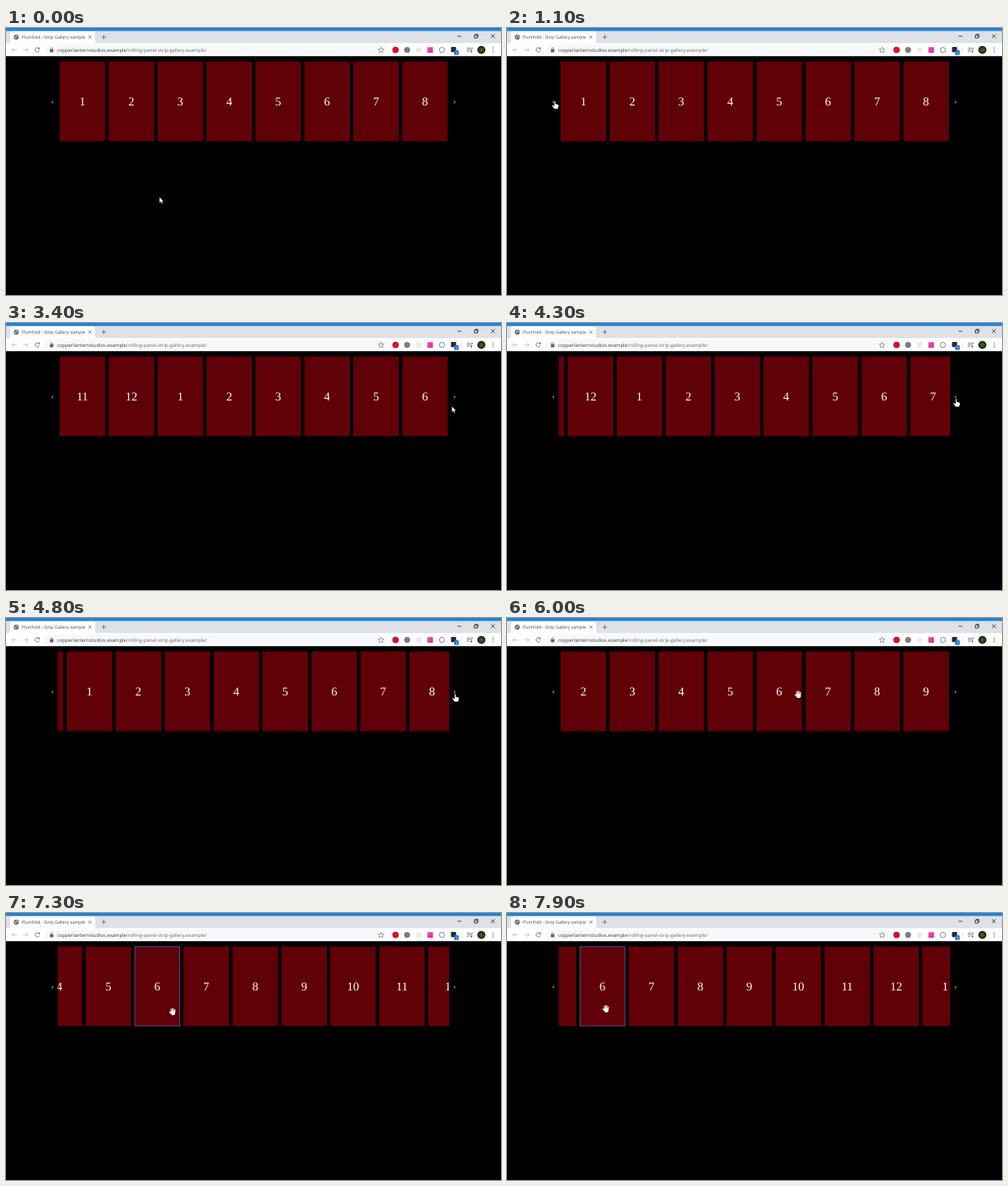
An HTML page that plays this animation: 600 by 324 pixels, repeating every 8 s.

```html
<!DOCTYPE html>
<html lang="en">
<head>
<meta charset="utf-8">
<title>Strip gallery</title>
<style>
  html, body { margin: 0; width: 100%; height: 100%; overflow: hidden; background: #000; }
  svg { display: block; width: 100%; height: 100%; }
  text { font-family: "Open Sans", "Noto Sans", sans-serif; text-rendering: geometricPrecision; }
  .number { font: 14.5px "Liberation Serif", "Times New Roman", serif; fill: #fff; text-anchor: middle; }
  .line { fill: none; stroke: #5f6368; stroke-width: .8; }
  .pointer { fill: #fff; stroke: #000; stroke-width: .4; stroke-linejoin: round; }
  .hand { fill: #fff; stroke: #fff; stroke-width: 1.1; stroke-linecap: round; stroke-linejoin: round; }
</style>
</head>
<body>
<svg viewBox="0 0 600 324">
  <defs>
    <clipPath id="window"><rect x="62.6" y="36" width="474.6" height="106"/></clipPath>
    <linearGradient id="pink" x2="1" y2="1">
      <stop stop-color="#f45bb0"/><stop offset="1" stop-color="#d8208a"/>
    </linearGradient>
    <radialGradient id="portrait">
      <stop stop-color="#4c6a2c"/><stop offset="1" stop-color="#12200c"/>
    </radialGradient>
  </defs>
  <rect width="600" height="324"/>

  <!-- Title bar and tab -->
  <rect width="600" height="19" fill="#dee1e6"/>
  <rect width="600" height="3.6" fill="#1c84d6"/>
  <path d="M2 18.5Q5 18.5 5 15.5V7Q5 4 8 4H105Q108 4 108 7V15.5Q108 18.5 111 18.5Z" fill="#fff"/>
  <circle cx="12.5" cy="11" r="3.1" fill="#5f6368"/>
  <path d="M10.4 10.2L12 11.4 11.8 13M12.8 8.6L13.2 10.2 14.8 11" class="line" style="stroke:#fff"/>
  <text x="19" y="13" font-size="5.35" fill="#45494d">Plumfold - Strip Gallery sample</text>
  <path d="M99.9 9.2l3.6 3.6m0-3.6l-3.6 3.6M115.8 11h5.4M118.5 8.3v5.4" class="line"/>
  <path d="M547.3 10h4.6M567.6 8.8h3.4v3.4h-3.4zM568.7 8.8v-1.1h3.4v3.4H571M587.9 7.6l4.6 4.6m0-4.6l-4.6 4.6" class="line" style="stroke:#222"/>

  <!-- Toolbar -->
  <rect y="18.4" width="600" height="15.8" fill="#fff"/>
  <path d="M12.8 26.6H7.2M9.8 23.8L7 26.6l2.8 2.8M21.2 26.6h5.6M24.2 23.8l2.8 2.8-2.8 2.8" class="line" style="stroke:#b4b7ba"/>
  <path d="M40.2 25A2.7 2.7 0 1 0 40.5 27.4M40.6 23.4V25.4H38.5" class="line"/>
  <rect x="47" y="20" width="416" height="13" rx="6.5" fill="#f7f8f9"/>
  <rect x="53.2" y="25.8" width="4.2" height="3.6" rx=".4" fill="#5f6368"/>
  <path d="M54.1 26v-1a1.2 1.2 0 0 1 2.4 0v1" class="line" style="stroke-width:.6"/>
  <text x="62" y="28.8" font-size="5.88" fill="#3c4043">copperlanternstudios.example<tspan fill="#6a6e73">/rolling-panel-strip-gallery.example/</tspan></text>
  <path d="M454.6 23.2l1 2.3 2.4.2-1.8 1.6.5 2.4-2.1-1.2-2.1 1.2.5-2.4-1.8-1.6 2.4-.2z" class="line" style="stroke-width:.6"/>
  <circle cx="472.2" cy="26.6" r="3.9" fill="#d4122e"/>
  <circle cx="486.2" cy="26.6" r="3.6" fill="#7c7c7e"/>
  <rect x="497" y="23.4" width="6.4" height="6.4" fill="#eeebec"/>
  <rect x="510.7" y="23.2" width="6.8" height="6.8" fill="url(#pink)"/>
  <circle cx="528.4" cy="26.6" r="3.1" class="line"/>
  <rect x="539.4" y="23" width="6.2" height="6.2" rx="1" fill="#26282a"/>
  <rect x="543.2" y="27" width="5.6" height="5.8" rx="1" fill="#2375d8"/>
  <text x="546" y="31.7" font-size="4.8" fill="#fff" text-anchor="middle">1</text>
  <path d="M551.8 22.5v8.5" class="line" style="stroke:#d5d8dc;stroke-width:.6"/>
  <path d="M558.6 24.4h4.4M558.6 26.4h4.4M558.6 28.4h2.6M564.2 28.6v-4.2h1.8" class="line"/>
  <circle cx="564" cy="28.8" r="1" fill="#5f6368"/>
  <circle cx="576.2" cy="26.6" r="4.9" fill="url(#portrait)"/>
  <path d="M590.5 24.2v4.9" class="line" style="stroke-width:1.4;stroke-linecap:round;stroke-dasharray:0 2.4"/>

  <!-- Carousel -->
  <g clip-path="url(#window)"><g id="track"></g></g>
  <path d="M57 88.4L55.6 90l1.4 1.6M543 88.4L544.4 90l-1.4 1.6" class="line" style="stroke:#f0f0f0"/>

  <g id="cursor">
    <path id="arrow" class="pointer" d="M0 0V7.4L1.8 5.8 3 8.6 4.2 8.1 3 5.4H5.3Z"/>
    <path id="finger" class="pointer" d="M-.8.6Q0-.4.8.6V3.6L3.6 4.2Q5 4.6 4.7 6L4 8.6Q3.8 9.8 2.8 9.8H0Q-.8 9.8-1.4 8.8L-3.4 6Q-3.6 4.6-2.2 5L-.8 6.2Z"/>
    <path id="grab" class="hand" d="M-1.5.3H2.7L2.5 2.4 1.7 3.9H-.7L-3.7.6-1.5 1ZM-2.2-2.6L-1.4.4M-.6-3.6L-.2.3M1.1-3.5V.3M2.9-2.3L2.6.4"/>
  </g>
</svg>
<script>
const LOOP = 8000, STEP = 100, PITCH = 59.33, FIRST_X = 65, SLIDE_WIDTH = 55.2, COUNT = 12;
const SLIDE_TIME = 500, DRAG_START = 6000, DRAG_SPEED = 1.9 / 1000;
const BUTTONS = { left: 57, right: 544, y: 90 };

// Button clicks: when, and by how many slides.
const clicks = [[1450, -1], [2100, -1], [4020, 1], [4520, 1], [5060, 1]];

// Straight cursor moves: from and until when, and where to.
const startPoint = [186, 205];
const moves = [
  [100, 400, 28, 114], [500, 1100, 58, 88.5], [2600, 3200, 539, 104], [3300, 3700, 544.5, 92],
  [5500, 6000, 353, 92.5], [6000, 7300, 202, 119.5], [7300, 7900, 120, 116]
];

const $ = id => document.getElementById(id);
const progress = (time, from, to) => Math.min(1, Math.max(0, (time - from) / (to - from)));
const bezier = (s, a, b) => 3 * s * (1 - s) ** 2 * a + 3 * s * s * (1 - s) * b + s ** 3;

// The CSS "ease" curve, solved by bisection.
function ease(x) {
  let low = 0, high = 1;
  for (let i = 0; i < 20; i++) {
    const middle = (low + high) / 2;
    if (bezier(middle, .25, .25) < x) low = middle; else high = middle;
  }
  return bezier(high, .1, 1);
}

function shiftAt(time) {
  const drag = Math.max(0, time - DRAG_START) * DRAG_SPEED;
  return clicks.reduce((sum, [at, by]) => sum + by * ease(progress(time, at, at + SLIDE_TIME)), drag);
}

function cursorAt(time) {
  let [x, y] = startPoint;
  for (const [from, to, toX, toY] of moves) {
    const part = progress(time, from, to);
    x += (toX - x) * part;
    y += (toY - y) * part;
  }
  return [x, y];
}

function cursorShape(x, y) {
  const toButton = Math.min(Math.abs(x - BUTTONS.left), Math.abs(x - BUTTONS.right));
  if (toButton < 3 && Math.abs(y - BUTTONS.y) < 4) return "finger";
  return x > 62 && x < 537 && y > 40 && y < 138 ? "grab" : "arrow";
}

function buildTrack() {
  const slideX = i => FIRST_X + (i - 1) * PITCH;
  let markup = "";
  for (let i = -2; i <= COUNT + 3; i++) {
    markup += `<rect x="${slideX(i)}" y="40.6" width="${SLIDE_WIDTH}" height="96.7" fill="#600007"/>
      <text class="number" x="${slideX(i) + SLIDE_WIDTH / 2}" y="94.2">${(i + COUNT - 1) % COUNT + 1}</text>`;
  }
  markup += `<rect id="focus" x="${slideX(6) + .3}" y="40.9" width="${SLIDE_WIDTH - .6}" height="96.1"
    fill="none" stroke="#4463ad" stroke-width=".8"/>`;
  $("track").innerHTML = markup;
}

const show = (id, visible) => $(id).setAttribute("visibility", visible ? "visible" : "hidden");

function draw(time) {
  const [x, y] = cursorAt(time);
  const shape = cursorShape(x, y);
  $("track").setAttribute("transform", `translate(${-shiftAt(time) * PITCH} 0)`);
  $("cursor").setAttribute("transform", `translate(${x} ${y})`);
  for (const id of ["arrow", "finger", "grab"]) show(id, id === shape);
  show("focus", time > DRAG_START);
}

const start = performance.now();
function render() {
  draw(Math.floor((performance.now() - start) % LOOP / STEP) * STEP);
  requestAnimationFrame(render);
}
buildTrack();
render();
</script>
</body>
</html>
```
